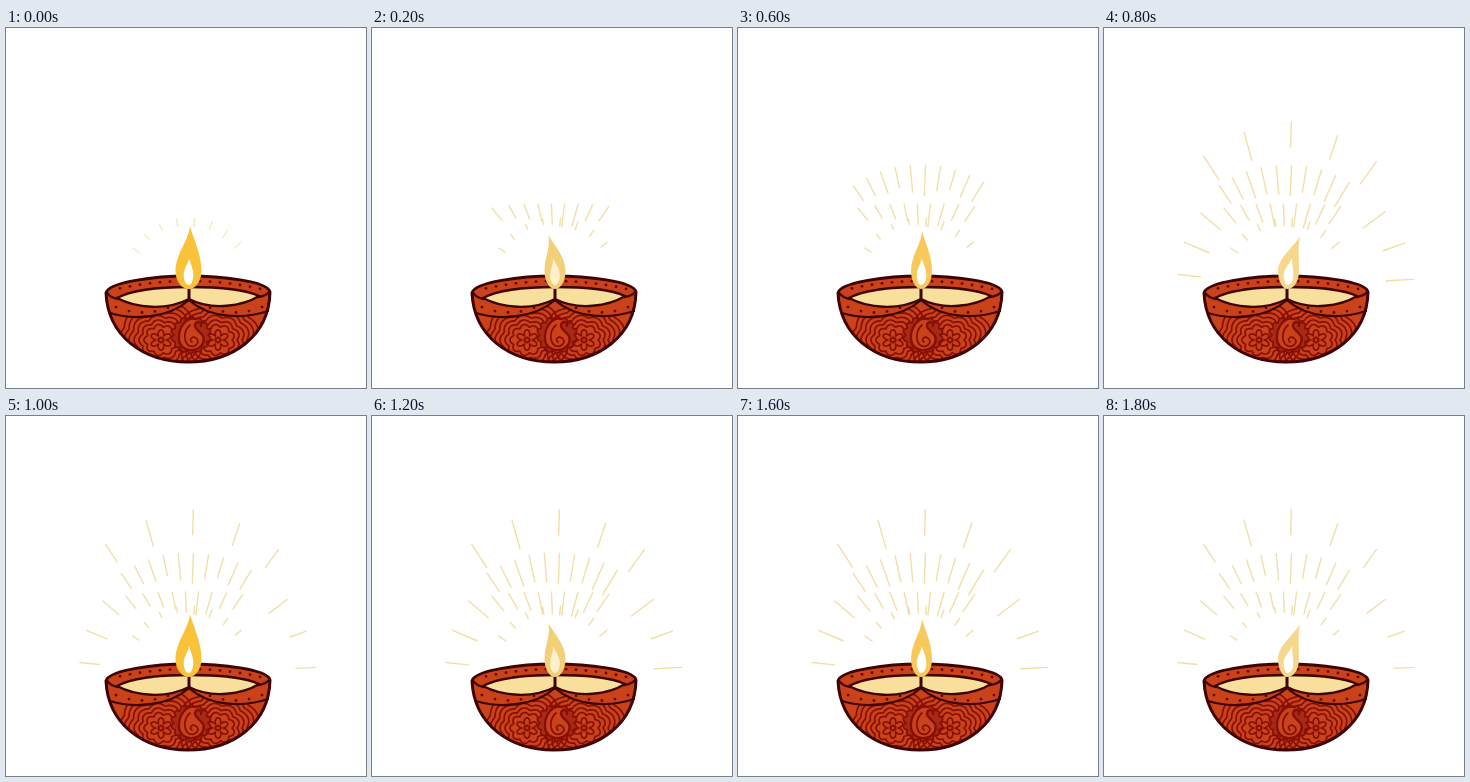
An HTML page for the animation above (2000 ms loop, 360 by 360 pixels).

```html
<!DOCTYPE html>
<html lang="en">
<head>
<meta charset="utf-8">
<title>Oil lamp</title>
<style>
  html, body { margin: 0; width: 100%; height: 100%; overflow: hidden; background: #fff; }
  svg { display: block; width: 100vw; height: 100vh; }
  path, circle { stroke-linecap: round; stroke-linejoin: round; }
  .outline { fill: none; stroke: #3e0406; stroke-width: 3; }
  .lip { stroke-width: 2.3; }
  .carving { fill: none; stroke: #850f07; stroke-width: 1.7; }
  .dots { fill: #5e0808; }
</style>
</head>
<body>
<svg viewBox="0 0 360 360">
  <defs>
    <path id="bowl" d="M100 265C102 254 150 248 182 248S262 253 264 264C263 308 227 334 182 334S102 308 100 265Z"/>
    <clipPath id="belly">
      <path d="M104 285C126 292 162 291 183 273C204 291 239 291 262 283C253 315 221 334 182 334S111 314 104 285Z"/>
    </clipPath>
  </defs>
  <path id="rays" fill="none"/>

  <use href="#bowl" fill="#c9421a"/>
  <path class="outline lip" style="fill:#f8df9b" d="M111 270C128 261 158 259 183 259S238 261 253 268C237 278 206 283 183 271C160 283 130 280 111 270Z"/>
  <g clip-path="url(#belly)">
    <g id="carvings" class="carving"></g>
    <path class="carving" style="fill:#c9421a;stroke-width:2.4" d="M190 291C180 288 172 300 173 312C175 325 193 325 197 315C201 305 188 303 189 297C190 292 196 294 195 298"/>
    <path class="carving" d="M184 297C178 302 177 312 182 317C188 321 194 315 191 311C187 307 182 311 186 314"/>
  </g>
  <g id="dots" class="dots"></g>
  <use href="#bowl" class="outline"/>
  <path class="outline lip" d="M101 265Q105 270 112 271M263 264Q260 268 252 269"/>
  <path class="outline lip" d="M104 285C126 292 162 291 183 272C204 291 239 291 262 283"/>
  <path class="outline" d="M183 259V272"/>

  <path id="flame"/>
  <path id="core"/>
</svg>
<script>
const LOOP = 2000, STEP = 200, WICK = { x: 183, y: 258 };
const el = id => document.getElementById(id);
const setAttrs = (id, attrs) => Object.entries(attrs).forEach(([k, v]) => el(id).setAttribute(k, v));
const noise = n => Math.abs(Math.sin(n * 127.1) * 43758.5453) % 1;

// Fans of rays from the inside out; angles in degrees from straight up.
const fans = [
  { from: -56, to: 50, count: 8, length: 8, radius: () => 68 },
  { from: -39, to: 34, count: 9, length: 21, radius: a => 82 + a * a * 0.012 },
  { from: -34, to: 31, count: 10, length: 26, radius: () => 121 },
  { from: -84, to: 87, count: 11, length: 25, radius: a => Math.abs(a) < 45 ? 165 - Math.abs(a) / 3 : 118 + a / 10 }
];

const poses = [
  { tip: [184, 198], belly: 182.5, width: 13, color: "#f8c33b", glow: "#fff" },
  { tip: [176, 207], belly: 183, width: 10.5, color: "#f1d079", glow: "#fcf0cd" },
  { tip: [165, 208], belly: 180.5, width: 10.5, color: "#f8c441", glow: "#fff8e4" },
  { tip: [184, 203], belly: 183.5, width: 10.5, color: "#f7c95a", glow: "#fff" },
  { tip: [196, 208], belly: 184.5, width: 10.5, color: "#f5d88d", glow: "#fff" }
];

function teardrop(tipX, tipY, bellyX, bellyY, width, baseY) {
  const left = bellyX - width, right = bellyX + width, mid = (tipX + bellyX) / 2;
  const neckY = tipY + (bellyY - tipY) * 0.3, shoulderY = tipY + (bellyY - tipY) * 0.62;
  const lowY = bellyY + (baseY - bellyY) * 0.6;
  return `M${tipX} ${tipY}C${mid} ${neckY} ${left} ${shoulderY} ${left} ${bellyY}` +
    `C${left} ${lowY} ${bellyX - width / 2} ${baseY} ${WICK.x} ${baseY}` +
    `C${bellyX + width / 2} ${baseY} ${right} ${lowY} ${right} ${bellyY}` +
    `C${right} ${shoulderY} ${mid + width / 3} ${neckY} ${tipX} ${tipY}Z`;
}

function fanPath({ from, to, count, length, radius }, shimmer) {
  let d = "";
  for (let i = 0; i < count; i++) {
    const degrees = from + (to - from) * i / (count - 1), a = degrees * Math.PI / 180;
    const outer = radius(degrees);
    const inner = outer - length * (0.8 + 0.4 * noise(i + count)) * (1 - shimmer * noise(i + 5));
    const point = r => `${WICK.x + r * Math.sin(a)} ${WICK.y - r * Math.cos(a)}`;
    d += `M${point(outer)}L${point(inner)}`;
  }
  return d;
}

function scallop(cx, cy, radius, lobes, depth) {
  let d = "";
  for (let i = 0; i < 120; i++) {
    const a = i / 120 * Math.PI * 2, r = radius + depth * Math.abs(Math.sin(a * lobes / 2));
    d += `${i ? "L" : "M"}${cx + r * Math.cos(a)} ${cy + r * Math.sin(a) * 0.92}`;
  }
  return d + "Z";
}

function decorate() {
  let carvings = "", dots = "";
  const dot = (x, y) => { dots += `<circle cx="${x}" cy="${y}" r="1.4"/>`; };
  const carve = (...shape) => { carvings += `<path d="${scallop(...shape)}"/>`; };
  for (const x of [155, 212]) {
    for (let r = 14; r < 42; r += 5) carve(x, 312, r, 9, 3);
    carve(x, 312, 5, 6, 6);
    carve(x, 312, 2, 6, 1);
  }
  carvings += `<path fill="#a92a12" d="${scallop(185, 307, 17, 14, 3)}"/>`;
  for (let x = 114; x < 256; x += 10) dot(x, 253 + 8 * ((x - WICK.x) / 72) ** 2);
  for (let dx = 21; dx < 75; dx += 13) {
    const y = 284.5 - (dx - 46) ** 2 / 135;
    dot(WICK.x - dx, y);
    dot(WICK.x + dx, y);
  }
  el("carvings").innerHTML = carvings;
  el("dots").innerHTML = dots;
}

function draw(step) {
  const { tip: [x, y], belly, width, color, glow } = poses[step % poses.length];
  setAttrs("flame", { d: teardrop(x, y, belly, 243, width, 261), fill: color });
  setAttrs("core", { d: teardrop(belly + (x - belly) * 0.3, 230, belly, 247, 4.8, 257), fill: glow });

  // The burst grows outward, then shimmers on every other step.
  const reach = Math.ceil((step + 1) * 0.75), shimmer = step % 2 * 0.3;
  setAttrs("rays", {
    d: fans.slice(0, reach).map(fan => fanPath(fan, shimmer)).join(""),
    stroke: shimmer ? "#efe0a9" : "#f2deA6",
    "stroke-width": step ? 1.4 : 1
  });
}

let shown = -1;
function tick() {
  const step = Math.floor(performance.now() % LOOP / STEP);
  if (step !== shown) draw(shown = step);
  requestAnimationFrame(tick);
}

decorate();
tick();
</script>
</body>
</html>
```
